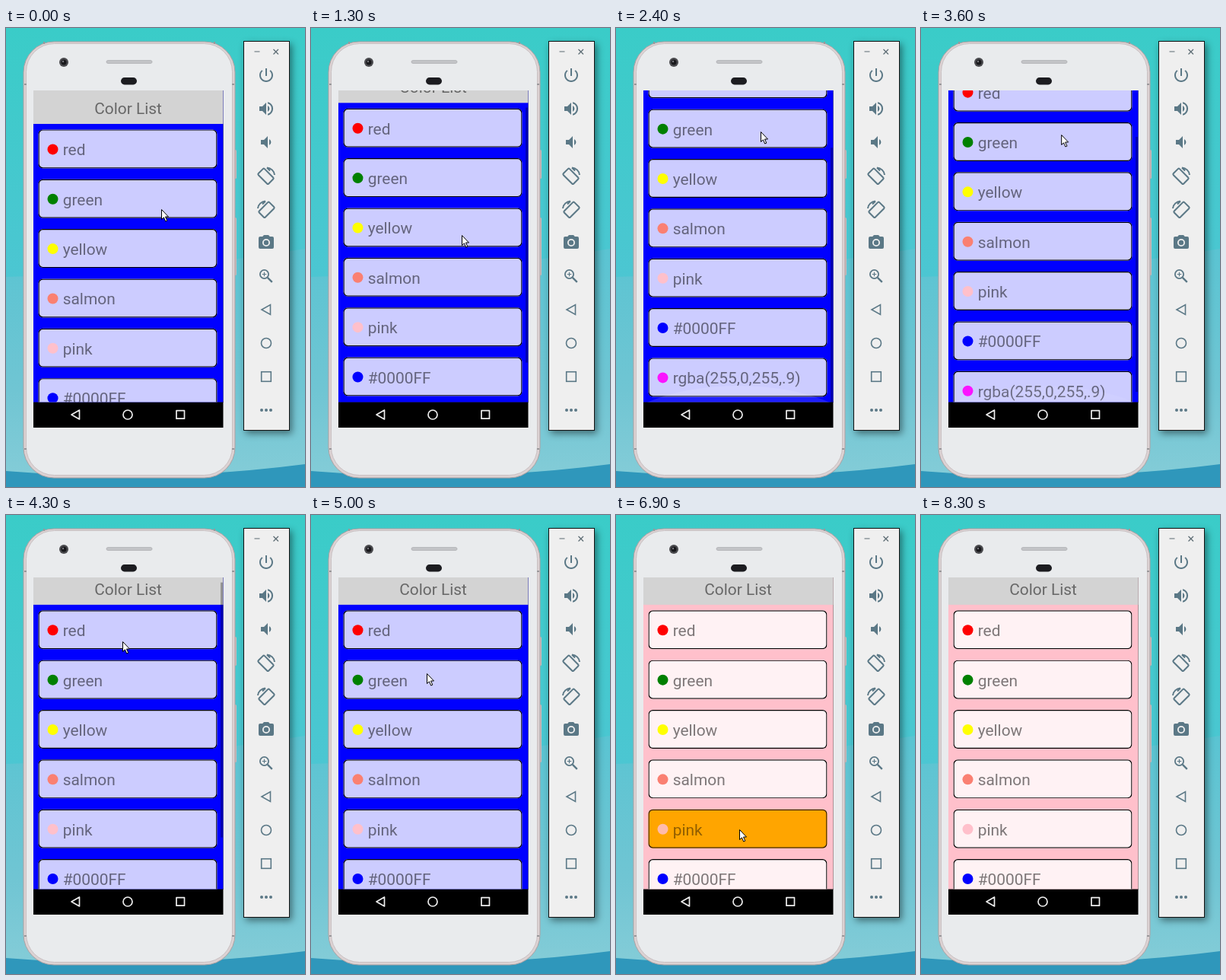
An HTML page for the animation above (9800 ms loop, 393x603 px).

```html
<!DOCTYPE html>
<html lang="en">
<head>
<meta charset="utf-8">
<title>Color List</title>
<style>
@property --s { syntax: "<number>"; inherits: true; initial-value: 0; }

html, body { margin: 0; width: 100%; height: 100%; overflow: hidden; }
body { position: relative; background: #3ccbc9; }
#scene, #icons { position: absolute; left: 0; top: 0; }

#panel {
  position: absolute; left: 312px; top: 17px; width: 59px; height: 510px;
  background: #efefef; border: 1px solid #111;
  box-shadow: 3px 4px 9px rgba(0, 0, 0, .45);
}

/* All clips share one clock; the small lead keeps steps on the 100 ms grid. */
#screen, #list, #cursor, .glow, #bar {
  animation-duration: 9800ms;
  animation-iteration-count: infinite;
  animation-delay: -10ms;
  animation-timing-function: step-end;
}

#screen {
  position: absolute; left: 36px; top: 82px; width: 250px; height: 410px;
  overflow: hidden; clip-path: inset(0 .6px .5px 0);
  font: 20.9px/26px Roboto, sans-serif;
  color: rgba(0, 0, 0, .51); animation-name: scroll;
}
#list {
  position: absolute; left: 0; top: 0; width: 100%; height: 700px;
  background: #00f; transform: translateY(calc(var(--s) * -1px));
  animation-name: paint;
}
h1 {
  margin: 0; height: 44px; background: #d3d3d3; text-align: center;
  font: inherit; line-height: 48px; text-indent: -1px;
}
.row {
  --dim: 1;
  position: absolute; left: 0; top: 0; width: 235.2px; height: 51px;
  transform: translate(6.5px, calc(51.4px + var(--i) * 65.35px));
  box-shadow: inset 0 0 0 1.22px rgba(0, 0, 0, var(--dim)); border-radius: 6px;
  background: rgba(255, 255, 255, .8);
}
.row i, .row span { position: absolute; opacity: var(--dim); }
.row i { left: 11.5px; top: 18.5px; width: 14px; height: 14px; border-radius: 50%; background: var(--c); }
.row span { left: 32.2px; top: 13.6px; white-space: nowrap; }
.press { animation: press 9800ms step-end infinite; }
.long { animation-name: press-long; }

.glow {
  position: absolute; left: -50px; width: 350px; height: 160px; border-radius: 50%;
  background: rgba(255, 255, 255, .12); opacity: 0;
}
.top { top: -138px; animation-name: glow-top; }
.bottom { bottom: -138px; animation-name: glow-bottom; }
#bar {
  position: absolute; right: 1px; top: 0; width: 3px; height: 335px;
  background: rgba(0, 0, 0, .3); transform: translateY(calc(var(--s) * .817px));
  animation-name: bar;
}
#cursor { position: absolute; left: 0; top: 0; overflow: visible; animation-name: move; }

@keyframes scroll {
  0% { --s: 0; animation-timing-function: steps(4); }
  4.08% { --s: 92.1; animation-timing-function: steps(3); }
  7.14% { --s: 0; }
  10.2% { --s: 0; animation-timing-function: steps(10); }
  20.4% { --s: 92.1; }
  35.71% { --s: 92.1; animation-timing-function: steps(3); }
  38.77% { --s: 40; animation-timing-function: steps(3); }
  41.83%, 100% { --s: 8.1; }
}
@keyframes paint {
  0% { background: #00f; }
  54.08% { background: green; }
  60.2% { background: yellow; }
  64.28% { background: salmon; }
  70.4%, 100% { background: pink; }
}
@keyframes press {
  0% { background: orange; --dim: .85; }
  2.04%, 100% { background: rgba(255, 255, 255, .8); --dim: 1; }
}
@keyframes press-long {
  0% { background: orange; --dim: .85; }
  3.06%, 100% { background: rgba(255, 255, 255, .8); --dim: 1; }
}
@keyframes glow-top {
  0% { opacity: 0; }
  7.14% { opacity: 0; animation-timing-function: steps(2); }
  9.18% { opacity: 1; }
  10.2% { opacity: 1; animation-timing-function: steps(2); }
  12.24%, 100% { opacity: 0; }
}
@keyframes glow-bottom {
  0% { opacity: 0; }
  20.4% { opacity: 0; animation-timing-function: steps(4); }
  24.48% { opacity: 1; }
  35.71% { opacity: 1; animation-timing-function: steps(2); }
  37.75%, 100% { opacity: 0; }
}
@keyframes bar {
  0% { opacity: 0; }
  1.02% { opacity: 1; }
  43.87% { opacity: 1; animation-timing-function: steps(4); }
  47.95%, 100% { opacity: 0; }
}
@keyframes move {
  0% { transform: translate(204px, 238px); animation-timing-function: steps(4); }
  4.08% { transform: translate(198px, 146px); animation-timing-function: steps(5); }
  9.18% { transform: translate(204px, 299px); }
  10.2% { transform: translate(204px, 299px); animation-timing-function: steps(3); }
  13.26% { transform: translate(198px, 272px); animation-timing-function: steps(7); }
  20.4% { transform: translate(194px, 207px); animation-timing-function: steps(4); }
  24.48% { transform: translate(190px, 136px); }
  35.71% { transform: translate(190px, 136px); animation-timing-function: steps(6); }
  41.83% { transform: translate(155px, 160px); }
  43.87% { transform: translate(153px, 166px); animation-timing-function: steps(3); }
  46.93% { transform: translate(295px, 60px); animation-timing-function: steps(2); }
  48.97% { transform: translate(263px, 192px); }
  51.02% { transform: translate(152px, 208px); }
  56.12% { transform: translate(152px, 271px); }
  58.16% { transform: translate(150px, 276px); }
  60.2% { transform: translate(150px, 315px); }
  62.24% { transform: translate(152px, 350px); }
  67.34% { transform: translate(161px, 412px); }
  70.4% { transform: translate(162px, 413px); animation-timing-function: steps(5); }
  75.51% { transform: translate(106px, 84px); }
  76.53% { transform: translate(106px, 84px); animation-timing-function: steps(8); }
  84.69%, 100% { transform: translate(78px, -24px); }
}
</style>
</head>
<body>
<svg id="scene" width="393" height="603">
  <defs>
    <linearGradient id="sky" x2="0" y2="1">
      <stop offset="0" stop-color="#3accc8"/>
      <stop offset="1" stop-color="#4cc6d2"/>
    </linearGradient>
    <linearGradient id="sea" x2="0" y2="1">
      <stop offset="0" stop-color="#5ac4d2"/>
      <stop offset=".6" stop-color="#70c5d3"/>
      <stop offset="1" stop-color="#86cdd8"/>
    </linearGradient>
  </defs>
  <rect width="393" height="330" fill="url(#sky)"/>
  <path d="M0 327Q200 322 393 290V603H0z" fill="url(#sea)"/>
  <path d="M0 582Q200 598 393 573V603H0z" fill="#2f97bb"/>

  <!-- phone body -->
  <g fill="#c9b9ba">
    <rect x="299" y="160" width="4" height="38" rx="1.5"/>
    <rect x="299" y="249" width="4" height="76" rx="1.5"/>
  </g>
  <rect x="23" y="18" width="278" height="573" rx="40" fill="#dcd2d3" stroke="#aca1a3"/>
  <rect x="26.5" y="20.5" width="271" height="567" rx="37" fill="#e9ebed" stroke="#c9c0c2"/>
  <path d="M50 18v3M274 18v3M24 74h3M297 74h3M24 553h3M297 553h3" stroke="#99979a" stroke-width="2"/>
  <circle cx="76" cy="45" r="6" fill="#4a4a4e"/>
  <circle cx="76" cy="45" r="3.5" fill="#18181b"/>
  <circle cx="75" cy="44" r="1.2" fill="#77777d"/>
  <rect x="132" y="42.5" width="60" height="4" rx="2" fill="#c3c4c7" stroke="#acadb1" stroke-width=".7"/>
  <rect x="151" y="65" width="21" height="9.5" rx="4.7" fill="#1c1c20"/>

  <!-- screen edge and navigation bar -->
  <rect x="36" y="82" width="249.7" height="410" fill="#444"/>
  <rect x="36" y="491.3" width="249.5" height="33.7"/>
  <g fill="none" stroke="#eee" stroke-width="1.7" stroke-linejoin="round">
    <path d="M96.5 502v12L86 508z"/>
    <circle cx="160" cy="508" r="6"/>
    <rect x="224" y="502.7" width="10.5" height="10.5"/>
  </g>
</svg>

<div id="screen">
  <div id="list"><h1>Color List</h1></div>
  <div class="glow top"></div>
  <div class="glow bottom"></div>
  <div id="bar"></div>
</div>

<div id="panel"></div>
<svg id="icons" width="393" height="603" fill="#5b7886">
  <defs>
    <g id="turn" fill="none" stroke="#5b7886" stroke-width="2">
      <rect x="-9.5" y="-5.7" width="19" height="11.4" rx="1.5" transform="translate(-.5 .8) rotate(45)"/>
      <path d="M1-10.5A10.5 10.5 0 0 1 11-1M1-10.5l4 4"/>
    </g>
  </defs>
  <path d="M326.5 31h7M351.5 28l6.5 6.5M358 28l-6.5 6.5" stroke="#5b6a72" stroke-width="1.2"/>
  <path transform="translate(330 50)" d="M13 3h-2v10h2V3zm4.83 2.17l-1.42 1.42C17.99 7.86 19 9.81 19 12c0 3.87-3.13 7-7 7s-7-3.13-7-7c0-2.19 1.01-4.14 2.58-5.42L6.17 5.17C4.23 6.82 3 9.26 3 12c0 4.97 4.03 9 9 9s9-4.03 9-9c0-2.74-1.23-5.18-3.17-6.83z"/>
  <path transform="translate(330 94)" d="M3 9v6h4l5 5V4L7 9H3zM14 8v8a4.5 4.5 0 0 0 0-8zM14 3.2v2.1a7 7 0 0 1 0 13.4v2.1a9 9 0 0 0 0-17.6z"/>
  <path transform="translate(330 138)" d="M5 9v6h4l5 5V4L9 9H5zM16 8v8a4.5 4.5 0 0 0 0-8z"/>
  <use href="#turn" transform="translate(342 194)"/>
  <use href="#turn" transform="translate(342 238) scale(-1 1)"/>
  <path transform="translate(330 270)" fill-rule="evenodd" d="M9 2L7.2 4H4a2 2 0 0 0-2 2v12a2 2 0 0 0 2 2h16a2 2 0 0 0 2-2V6a2 2 0 0 0-2-2h-3.2L15 2zM12 7a5 5 0 0 1 0 10a5 5 0 0 1 0-10zM12 8.8a3.2 3.2 0 0 0 0 6.4a3.2 3.2 0 0 0 0-6.4z"/>
  <g fill="none" stroke="#5b7886" stroke-width="1.8">
    <circle cx="339.5" cy="323.5" r="5.6"/>
    <path d="M343.8 327.8l6 6" stroke-width="2.4"/>
    <path d="M336.7 323.5h5.6M339.5 320.7v5.6" stroke-width="1.2"/>
    <path d="M347.5 363.5v13L336 370z" stroke-width="1.6"/>
    <circle cx="342" cy="414" r="6.5" stroke-width="1.6"/>
    <rect x="335.7" y="451.7" width="12.6" height="12.6" stroke-width="1.6"/>
  </g>
  <circle cx="336" cy="502" r="2"/>
  <circle cx="342" cy="502" r="2"/>
  <circle cx="348" cy="502" r="2"/>
</svg>

<svg id="cursor" width="12" height="18">
  <path d="M.5.5V13.5L3.4 10.8L5.7 16L7.8 15.1L5.5 10H9.5z" fill="#fff" stroke="#000"/>
</svg>

<script>
const colors = ["red", "green", "yellow", "salmon", "pink", "#0000FF", "rgba(255,0,255,.9)"];
const taps = { green: 5300, yellow: 5900, salmon: 6300, pink: 6900 };
const list = document.getElementById("list");

colors.forEach((color, i) => {
  const row = document.createElement("div");
  row.className = "row";
  row.style.setProperty("--i", i);
  row.style.setProperty("--c", color);
  const label = document.createElement("span");
  label.textContent = color;
  row.append(document.createElement("i"), label);
  if (taps[color]) {
    row.classList.add("press");
    row.classList.toggle("long", color === "salmon");
    row.style.animationDelay = taps[color] - 10 + "ms";
  }
  list.append(row);
});
</script>
</body>
</html>
```
